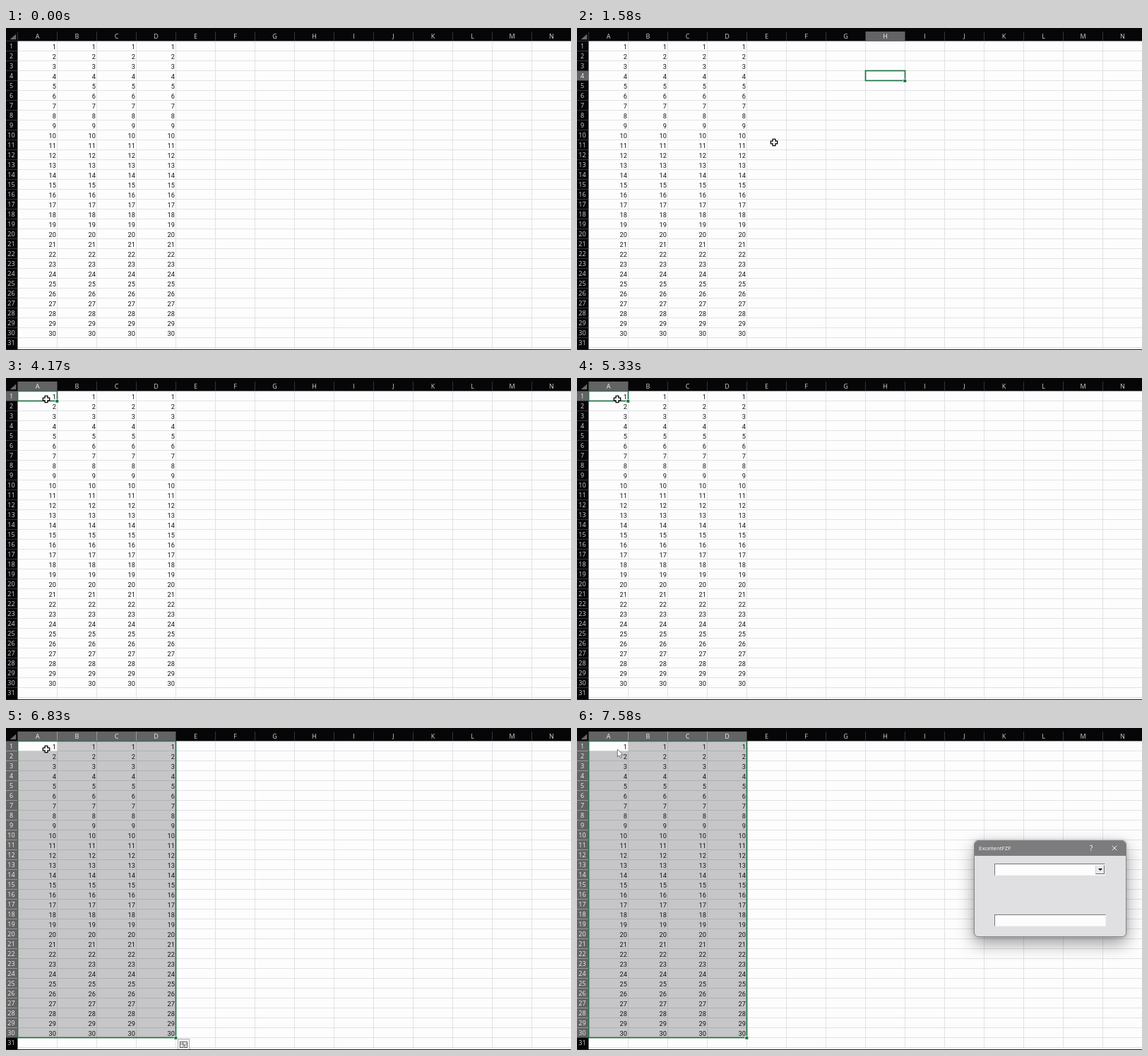
An HTML page with a canvas for the animation above (8000 ms loop, 800 px wide and 456 px high).

```html
<!DOCTYPE html>
<html lang="en">
<head>
<meta charset="utf-8">
<title>Spreadsheet</title>
<style>
html, body { margin: 0; width: 100%; height: 100%; overflow: hidden; background: #060508; }
canvas { position: absolute; left: 0; top: 0; }
#dialog {
  position: absolute; left: 562px; top: 159px; width: 214px; height: 135px;
  border: 1px solid #858486; border-radius: 6px; background: #e0dfe1;
  box-shadow: 0 9px 24px rgba(0, 0, 0, .4), 0 0 5px rgba(0, 0, 0, .18);
  font: 7.9px "Open Sans", "Noto Sans", sans-serif; color: #fff; opacity: 0;
}
#dialog * { position: absolute; box-sizing: border-box; }
#bar { left: 0; top: 0; width: 214px; height: 21px; border-radius: 5px 5px 0 0; background: #7c7b7d; line-height: 21px; }
#bar span { left: 6px; }
#bar b { left: 163px; font: 10px/21px "Open Sans", sans-serif; }
#bar svg { left: 194px; top: 6px; }
.field { left: 28px; height: 17px; background: #fefdfe; border: 1px solid #f3f2f4; border-top-color: #77767a; border-left-color: #77767a; }
#combo { top: 32px; width: 157px; }
#input { top: 104px; width: 158px; }
#arrow { right: 0; top: 1px; width: 13px; height: 13px; background: #eae9eb; border: 1px solid #6c6b6e; border-top-color: #f6f6f6; border-left-color: #cccbcd; }
#arrow i { left: 3px; top: 4px; border: 3px solid transparent; border-top-color: #000; border-bottom: 0; }
#caret { left: 8px; top: 2px; width: 1px; height: 9px; background: #000; }
</style>
</head>
<body>
<canvas id="stage" width="800" height="456"></canvas>
<div id="dialog">
  <div id="bar">
    <span>ExcellentFZF</span><b>?</b>
    <svg width="8" height="8"><path d="M.8 .8L7.2 7.2M7.2 .8L.8 7.2" stroke="#fff" stroke-width=".9"/></svg>
  </div>
  <div id="combo" class="field"><div id="caret"></div><div id="arrow"><i></i></div></div>
  <div id="input" class="field"></div>
</div>
<script>
const g = document.getElementById('stage').getContext('2d');
const dialog = document.getElementById('dialog');
const caret = document.getElementById('caret');

const LOOP = 8000, STEP = 1000 / 12;
const COLS = 14, ROWS = 31;
const GREEN = '#1f7244';
const colX = c => 16.5 + 56 * c;
const rowY = r => 18.5 + 14 * r;
const clamp = v => Math.max(0, Math.min(1, v));
const mix = (a, b, p) => a + (b - a) * p;

// Selections as [left, top, right, bottom] in cells.
const H4 = [7, 3, 8, 4], A1 = [0, 0, 1, 1], BLOCK = [0, 0, 4, 30];
// Pointer stops: [step, x, y].
const PATH = [[10, 165, 296], [13, 282, 167], [18, 282, 167], [19, 279, 162], [23, 279, 162], [31, 57, 30]];

function rect(x, y, w, h, color) {
  g.fillStyle = color;
  g.fillRect(x, y, w, h);
}

function line(x1, y1, x2, y2, color) {
  g.strokeStyle = color;
  g.lineWidth = 1;
  g.beginPath();
  g.moveTo(x1, y1);
  g.lineTo(x2, y2);
  g.stroke();
}

function text(s, x, y, color) {
  g.fillStyle = color;
  g.fillText(s, x, y);
}

function shape(points, fill, stroke, width) {
  g.beginPath();
  points.forEach(([x, y]) => g.lineTo(x, y));
  g.closePath();
  g.fillStyle = fill;
  g.fill();
  g.strokeStyle = stroke;
  g.lineWidth = width;
  g.stroke();
}

function drawGrid(color) {
  for (let c = 1; c < COLS; c++) line(colX(c), 19, colX(c), 455, color);
  for (let r = 1; r <= ROWS; r++) line(17, rowY(r), 800, rowY(r), color);
}

function drawHeaders(cells) {
  const [l, t, r, b] = cells || [0, 0, 0, 0];
  g.font = '9px "Open Sans", "Noto Sans", sans-serif';
  g.textAlign = 'center';
  rect(0, 0, 800, 18.5, '#060508');
  rect(0, 0, 16.5, 456, '#060508');
  shape([[14, 9], [14, 16], [6, 16]], '#6b6a6c', '#6b6a6c', .4);
  for (let c = 0; c < COLS; c++) {
    const on = c >= l && c < r;
    if (on) rect(colX(c), 5, 56, 13.5, '#636264');
    line(colX(c), 5, colX(c), 18, on && c > l ? '#969597' : '#343336');
    text(String.fromCharCode(65 + c), colX(c) + 28, 15, on ? '#f2f2f2' : '#d6d5d7');
  }
  for (let i = 0; i < ROWS; i++) {
    const on = i >= t && i < b;
    if (on) rect(0, rowY(i), 16, 14, '#636264');
    line(0, rowY(i), 16, rowY(i), on && i > t ? '#969597' : '#343336');
    text(i + 1, 7.5, rowY(i) + 10.8, on ? '#f2f2f2' : '#d6d5d7');
  }
}

function drawNumbers() {
  g.font = '9.2px Roboto, Arial, sans-serif';
  g.textAlign = 'right';
  for (let c = 0; c < 4; c++)
    for (let r = 0; r < 30; r++) text(r + 1, colX(c) + 54.3, rowY(r) + 11, '#111');
}

function drawOutline([x1, y1, x2, y2]) {
  g.save();
  g.beginPath();
  g.rect(16, 18, 784, 438);
  g.clip();
  g.strokeStyle = GREEN;
  g.lineWidth = 1.7;
  g.strokeRect(x1, y1, x2 - x1, y2 - y1);
  rect(x2 - 3, y2 - 2.5, 5.5, 5, '#fefdfe');
  rect(x2 - 2.2, y2 - 1.7, 4, 4, GREEN);
  g.restore();
}

function drawQuickButton() {
  rect(243, 440, 17, 16, '#a9a8aa');
  rect(244, 441, 15, 14, '#f6f5f7');
  g.strokeStyle = '#58575a';
  g.lineWidth = 1;
  g.strokeRect(246.5, 444.5, 10, 8);
  line(247, 447.5, 256, 447.5, '#77767a');
  line(250.5, 445, 250.5, 452, '#77767a');
  shape([[254, 446], [250, 450], [252, 450], [250, 454], [256, 449], [253, 449]], '#5d8a6e', '#f6f5f7', .5);
}

function drawCross(x, y) {
  const a = 4.7, b = 1.9;
  const plus = [[-b, -a], [b, -a], [b, -b], [a, -b], [a, b], [b, b], [b, a], [-b, a], [-b, b], [-a, b], [-a, -b], [-b, -b]];
  shape(plus.map(([u, v]) => [x + u, y + v]), '#fff', '#000', 1.3);
}

function drawArrow(x, y) {
  const tip = [[0, 0], [0, 11], [2.5, 8.8], [4.2, 12.4], [6, 11.6], [4.4, 8], [7.8, 8]];
  shape(tip.map(([u, v]) => [x + u, y + v]), '#fff', '#555', .8);
}

function pointerAt(n) {
  let i = 0;
  while (i < PATH.length - 2 && n > PATH[i + 1][0]) i++;
  const [n0, x0, y0] = PATH[i], [n1, x1, y1] = PATH[i + 1];
  const p = clamp((n - n0) / (n1 - n0)), e = p * p * (3 - 2 * p);
  return [mix(x0, x1, e), mix(y0, y1, e)];
}

const bounds = ([l, t, r, b]) => [colX(l), rowY(t), colX(r), rowY(b)];

// The outline glides quickly from one selection to the next.
function glide(from, to, p) {
  const e = 1 - (1 - clamp(p)) ** 3, end = bounds(to);
  return bounds(from).map((v, i) => mix(v, end[i], e));
}

function draw(n) {
  const cells = n < 19 ? null : n < 32 ? H4 : n < 65 ? A1 : BLOCK;
  const box = n < 32 ? bounds(H4) : n < 65 ? glide(H4, A1, (n - 31) / 3) : glide(A1, BLOCK, (n - 64) * .67);

  rect(0, 0, 800, 456, '#fefdfe');
  drawGrid('#e1e0e3');
  if (n >= 65) {
    g.save();
    g.beginPath();
    g.rect(box[0], box[1], box[2] - box[0], box[3] - box[1]);
    g.clip();
    rect(0, 0, 800, 456, '#c6c5c7');
    drawGrid('#b0afb1');
    rect(17, 19, 55.5, 13.5, '#fefdfe');
    g.restore();
  }
  drawNumbers();
  drawHeaders(cells);
  if (cells) drawOutline(box);
  if (n >= 65 && n < 83) drawQuickButton();
  rect(0, 455, 800, 1, '#1b1a1d');

  if (n >= 83) drawArrow(57.3, 30);
  else if (n >= 10) drawCross(...pointerAt(n));

  const open = 1 - (1 - clamp((n - 83) / 4)) ** 2;
  dialog.style.opacity = open;
  dialog.style.transform = `scale(${mix(.9, 1, open)})`;
  caret.style.opacity = n >= 85 && n < 91 ? 1 : 0;
}

function tick() {
  draw(Math.floor((performance.now() % LOOP + 4) / STEP) % 96);
  requestAnimationFrame(tick);
}
tick();
</script>
</body>
</html>
```
